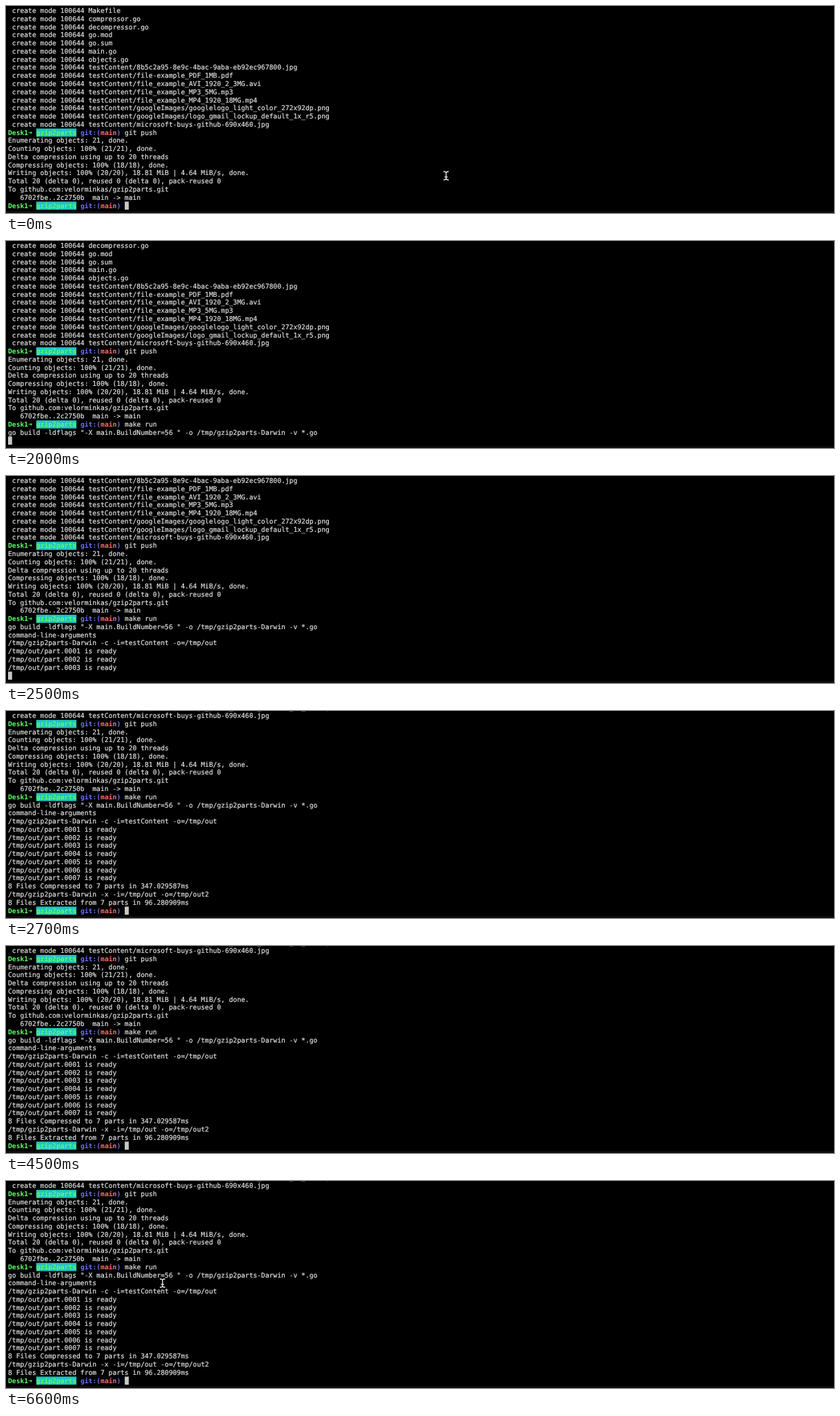
Recreate the animation shown at these times as an HTML page. Size 1200 by 300 pixels, loop 6700 ms.

```html
<!DOCTYPE html>
<html lang="en">
<head>
<meta charset="utf-8">
<title>Terminal session</title>
<style>
  html, body { margin: 0; width: 100%; height: 100%; overflow: hidden; background: #000; }
  svg { display: block; width: 1200px; height: 300px; }
  text {
    font: 9.684px "DejaVu Sans Mono", monospace;
    fill: #e4e4e4;
    stroke: #e4e4e4;
    stroke-width: 0.18px;
    white-space: pre;
    text-rendering: geometricPrecision;
  }
  .bold { font-weight: bold; stroke: none; }
</style>
</head>
<body>
<svg id="stage" viewBox="0 0 1200 300">
  <defs>
    <path id="beam" d="M-3.3 -6Q0 -6 0 -4Q0 -6 3.3 -6M0 -4V4M-3.3 6Q0 6 0 4Q0 6 3.3 6M-1.8 1.8H1.8"/>
  </defs>
  <rect width="1200" height="300" fill="#000"/>
  <g id="screen"></g>
  <rect y="298" width="1200" height="1" fill="#241e20"/>
  <g id="pointer" fill="none" stroke-linecap="round">
    <use href="#beam" stroke="#000" stroke-width="2.8"/>
    <use href="#beam" stroke="#f4f4f4" stroke-width="1.3"/>
  </g>
</svg>
<script>
const LOOP = 6700;
const LEFT = 3, CELL = 5.83, PITCH = 11.765, BOTTOM = 292.5;
const PROMPT_COLS = 29;
const COMMAND = "make run";
const GREEN = "#5ffa68", CYAN = "#20c4c0", BLUE = "#6871ff", RED = "#ff6e67";

const screen = document.getElementById("screen");
const pointer = document.getElementById("pointer");

const created = [
  "Makefile", "compressor.go", "decompressor.go", "go.mod", "go.sum", "main.go", "objects.go",
  ...[
    "8b5c2a95-8e9c-4bac-9aba-eb92ec967800.jpg",
    "file-example_PDF_1MB.pdf",
    "file_example_AVI_1920_2_3MG.avi",
    "file_example_MP3_5MG.mp3",
    "file_example_MP4_1920_18MG.mp4",
    "googleImages/googlelogo_light_color_272x92dp.png",
    "googleImages/logo_gmail_lockup_default_1x_r5.png",
    "microsoft-buys-github-690x460.jpg"
  ].map(name => "testContent/" + name)
].map(name => " create mode 100644 " + name);

const prompt = command => ({ command });

const lines = [
  ...created,
  prompt("git push"),
  "Enumerating objects: 21, done.",
  "Counting objects: 100% (21/21), done.",
  "Delta compression using up to 20 threads",
  "Compressing objects: 100% (18/18), done.",
  "Writing objects: 100% (20/20), 18.81 MiB | 4.64 MiB/s, done.",
  "Total 20 (delta 0), reused 0 (delta 0), pack-reused 0",
  "To github.com:velorminkas/gzip2parts.git",
  "   6702fbe..2c2750b  main -> main",
  prompt(""),
  'go build -ldflags "-X main.BuildNumber=56 " -o /tmp/gzip2parts-Darwin -v *.go',
  "command-line-arguments",
  "/tmp/gzip2parts-Darwin -c -i=testContent -o=/tmp/out",
  ...Array.from({ length: 7 }, (_, i) => `/tmp/out/part.000${i + 1} is ready`),
  "8 Files Compressed to 7 parts in 347.029587ms",
  "/tmp/gzip2parts-Darwin -x -i=/tmp/out -o=/tmp/out2",
  "8 Files Extracted from 7 parts in 96.280909ms",
  prompt("")
];

const RUN_LINE = 24;
const LAST_LINE = lines.length - 1;

// [time, index of the line that holds the cursor]
const output = [[0, RUN_LINE], [2000, 26], [2200, 27], [2400, 28], [2500, 31], [2600, 37], [2700, LAST_LINE]];
const keyTimes = [200, 300, 400, 500, 800, 1200, 1300, 1400];

function add(parent, tag, attrs, content = "") {
  const node = document.createElementNS("http://www.w3.org/2000/svg", tag);
  for (const key in attrs) node.setAttribute(key, attrs[key]);
  node.textContent = content;
  return parent.appendChild(node);
}

const column = col => LEFT + col * CELL;

function write(row, col, content, color) {
  const style = color ? { class: "bold", style: `fill:${color}` } : {};
  return add(row, "text", { x: column(col), y: 0, ...style }, content);
}

function drawPrompt(row, command) {
  write(row, 0, "Desk1", GREEN);
  write(row, 5, "➜", GREEN);
  add(row, "rect", { x: column(7), y: -9, width: CELL * 10, height: PITCH, fill: CYAN });
  write(row, 7, "gzip2parts", GREEN);
  write(row, 18, "git:(", BLUE);
  write(row, 23, "main", RED);
  write(row, 27, ")", BLUE);
  return write(row, PROMPT_COLS, command);
}

let typedText;
const rows = lines.map((line, i) => {
  const row = add(screen, "g", { transform: `translate(0 ${i * PITCH})` });
  if (typeof line === "string") {
    write(row, 0, line);
  } else {
    const commandText = drawPrompt(row, line.command);
    if (i === RUN_LINE) typedText = commandText;
  }
  return row;
});
const cursor = add(screen, "rect", { width: CELL, height: PITCH, fill: "#c7c7c7" });

function placePointer(t) {
  const visible = t < 200 || t >= 6000;
  pointer.style.display = visible ? "" : "none";
  const u = t < 200 ? 0 : Math.min(1, Math.max(0, (t - 5960) / 600));
  const eased = u * u * (3 - 2 * u);
  pointer.setAttribute("transform", `translate(${637.8 - 411 * eased} ${246 - 98 * eased})`);
}

function render(time) {
  const t = Math.floor((time % LOOP) / 100) * 100;
  const current = output.filter(([start]) => t >= start).pop()[1];
  const typed = keyTimes.filter(start => t >= start).length;
  const atPrompt = current === RUN_LINE || current === LAST_LINE;

  rows.forEach((row, i) => {
    row.style.display = i < current || (i === current && atPrompt) ? "" : "none";
  });
  typedText.textContent = COMMAND.slice(0, typed);

  const col = current === RUN_LINE ? PROMPT_COLS + typed : atPrompt ? PROMPT_COLS : 0;
  cursor.setAttribute("x", column(col));
  cursor.setAttribute("y", current * PITCH - 9);
  screen.setAttribute("transform", `translate(0 ${BOTTOM - current * PITCH})`);
  placePointer(t);
}

const start = performance.now();
function tick() {
  render(performance.now() - start);
  requestAnimationFrame(tick);
}
tick();
</script>
</body>
</html>
```
